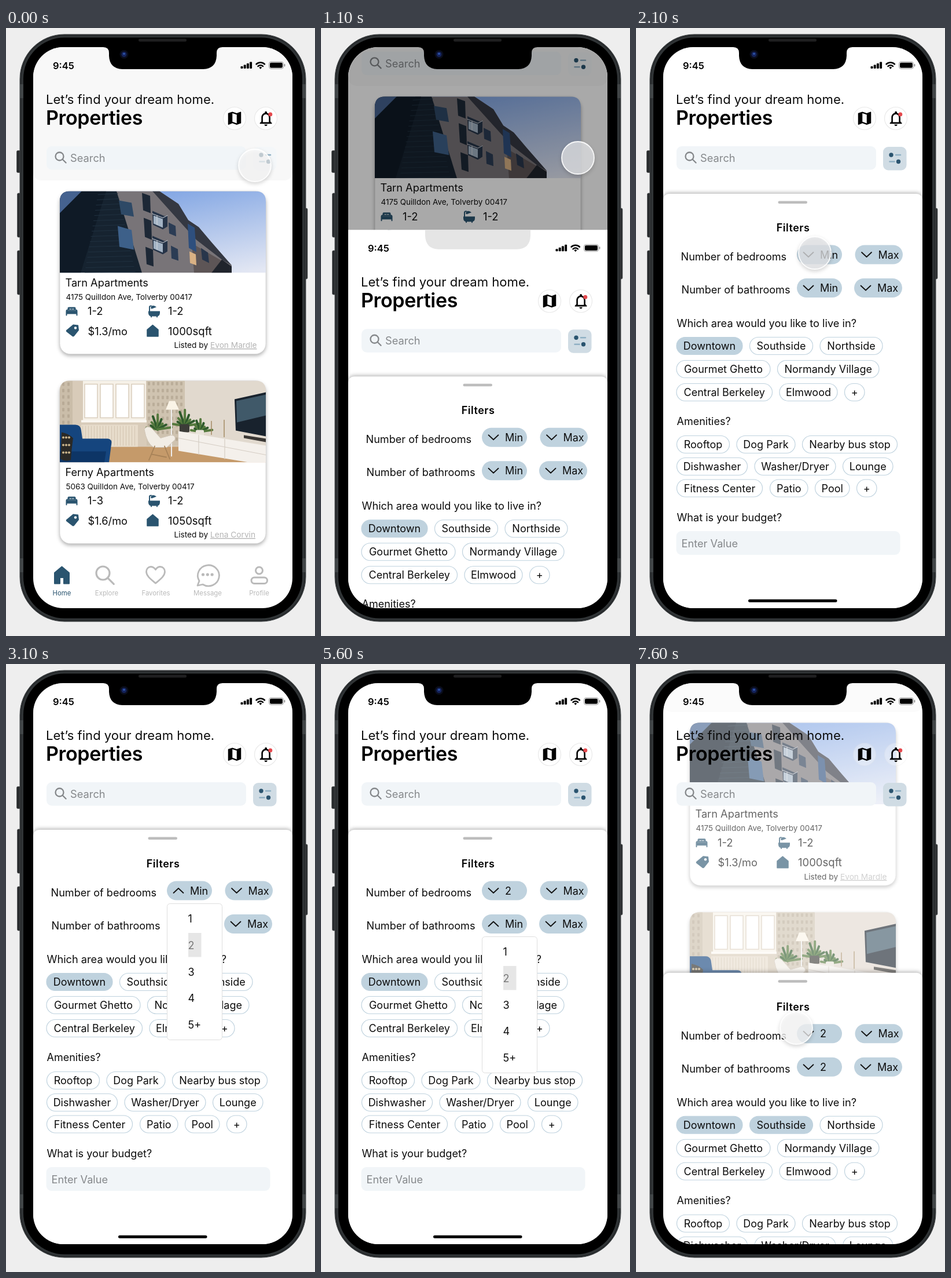
Write an HTML page that moves like this. It is 534 px wide and 1049 px high and loops after 7.7 s.

```html
<!DOCTYPE html>
<html lang="en">
<head>
<meta charset="utf-8">
<title>Property filters</title>
<style>
  html, body { margin: 0; width: 100%; height: 100%; overflow: hidden; background: #eee; }
  svg { display: block; width: 100vw; height: 100vh; font-family: Inter, Roboto, sans-serif; }
  text { white-space: pre; }
  .card { filter: drop-shadow(0 3px 3px rgba(0,0,0,.3)); }
  .sheet { filter: drop-shadow(0 -2px 3px rgba(0,0,0,.28)); }
  .cursor { filter: drop-shadow(0 3px 3px rgba(0,0,0,.2)); }
  .line { fill: none; stroke-linecap: round; stroke-linejoin: round; }
</style>
</head>
<body>
<svg id="stage" viewBox="0 0 534 1049"></svg>
<script>
const LOOP = 7700, STEP = 100, SCREEN_H = 968;
const NAVY = '#2a546f', PILL = '#bfd2de', GREY = '#bababa';

// Drawing helpers
const rect = (x, y, w, h, r, fill, extra = '') =>
  `<rect x="${x}" y="${y}" width="${w}" height="${h}" rx="${r}" fill="${fill}" ${extra}/>`;
const circle = (x, y, r, fill, extra = '') => `<circle cx="${x}" cy="${y}" r="${r}" fill="${fill}" ${extra}/>`;
const poly = (points, fill) => `<polygon points="${points}" fill="${fill}"/>`;
const path = (d, fill, extra = '') => `<path d="${d}" fill="${fill}" ${extra}/>`;
const line = (d, color, width) => `<path class="line" d="${d}" stroke="${color}" stroke-width="${width}"/>`;
const text = (x, y, size, str, fill = '#0c0c0c', extra = '') =>
  `<text x="${x}" y="${y}" font-size="${size}" fill="${fill}" ${extra}>${str}</text>`;
const at = (x, y, body, scale = 1) => `<g transform="translate(${x} ${y}) scale(${scale})">${body}</g>`;
const repeat = (n, draw) => Array.from({ length: n }, (_, i) => draw(i)).join('');

const MAP = 'M20.5 3l-.16.03L15 5.1 9 3 3.36 4.9c-.21.07-.36.25-.36.48V20.5c0 .28.22.5.5.5l.16-.03L9 18.9l6 2.1 5.64-1.9c.21-.07.36-.25.36-.48V3.5c0-.28-.22-.5-.5-.5zM15 19l-6-2.11V5l6 2.11z';
const BELL = 'M12 22c1.1 0 2-.9 2-2h-4c0 1.1.9 2 2 2zm6-6v-5c0-3.07-1.63-5.64-4.5-6.32V4c0-.83-.67-1.5-1.5-1.5s-1.5.67-1.5 1.5v.68C7.64 5.36 6 7.92 6 11v5l-2 2v1h16v-1l-2-2zm-2 1H8v-6c0-2.48 1.51-4.5 4-4.5s4 2.02 4 4.5z';

const statusBar =
  text(81, 70.5, 16.5, '9:45', '#000', 'font-weight="600"') +
  repeat(4, i => rect(405.5 + i * 5.2, 66 - i * 2.5, 4, 4 + i * 2.5, 1, '#000')) +
  line('M432.5 62.5a10.5 10.5 0 0 1 14.5 0M435.5 66a6 6 0 0 1 8.5 0', '#000', 2.5) +
  path('M439.8 71l-2.5-3a4 4 0 0 1 5 0z', '#000') +
  rect(454.5, 58.3, 25, 12, 3.5, 'none', 'stroke="#999"') +
  rect(456, 59.8, 22, 9, 2.2, '#000') + rect(480.7, 62, 1.6, 4.5, 1, '#888');

const magnifier = (x, y, r, tail, color, width) =>
  circle(x, y, r, 'none', `stroke="${color}" stroke-width="${width}"`) +
  line(`M${x + r * .72} ${y + r * .72}l${tail} ${tail}`, color, width);

const disc = x => circle(x, 156, 19.5, '#fff', 'class="disc" stroke="#e9e9e9" stroke-width="1.2"');

const header = buttonFill => statusBar +
  text(69, 130.5, 22.1, 'Let’s find your dream home.') +
  text(69, 167, 34, 'Properties', '#000', 'font-weight="600" letter-spacing="-.35"') +
  disc(395) + at(380, 140.7, path(MAP, '#000'), 1.25) +
  disc(449) + at(433.5, 140.5, path(BELL, '#000'), 1.3) + circle(456.8, 149, 3.5, '#e5484d') +
  rect(70, 204, 345, 40.5, 9, '#f1f5f8') +
  magnifier(92.5, 221.5, 7, 6, '#85888b', 2.3) +
  text(111, 231, 18.3, 'Search', '#85888b') +
  rect(427, 205, 40.5, 40.5, 9, buttonFill) +
  line('M449 219h8M438.5 230.5h8', '#8fb0c4', 2.6) +
  circle(441, 219, 3.7, NAVY) + circle(453.5, 230.5, 3.7, NAVY);

// Card pictures, 356 x 141
const building = rect(0, 0, 356, 141, 0, 'url(#sky)') +
  poly('70,0 172,0 205,22 222,50 240,62 262,88 297,128 297,141 70,141', '#787478') +
  poly('172,0 205,22 222,50 240,62 262,88 297,128 280,118 236,84 205,50 160,0', '#343842') +
  poly('228,90 297,130 297,141 232,141', '#5d5556') +
  poly('0,0 98,0 142,141 0,141', '#162330') + poly('0,0 38,0 0,38', '#45628f') +
  poly('38,0 80,0 36,141 0,141 0,38', '#0f1a26') +
  repeat(16, i => line(`M${66 - i * 1.5} ${6 + i * 9}L${100 + i * 2} ${4 + i * 9}`, '#203140', 1)) +
  poly('102,16 124,20 128,44 106,40', '#2e4966') + poly('100,60 124,67 128,101 103,96', '#3d6089') +
  poly('142,3 156,8 157,38 144,33', '#1d2836') + poly('145,46 158,51 159,84 147,79', '#1d2836') +
  poly('148,96 161,101 162,130 150,126', '#1d2836') + poly('188,54 200,60 201,78 189,73', '#2b3c54') +
  poly('192,94 204,100 205,120 193,116', '#2b3c54') + poly('221,56 233,63 236,105 223,98', '#2e4f7d') +
  poly('224,104 235,109 236,128 225,124', '#d9b184') + poly('244,98 256,106 258,124 246,118', '#28364b') +
  [34, 77].map(y => poly(`160,${y} 181,${y + 9} 186,${y + 8} 186,${y + 27} 178,${y + 32} 161,${y + 24}`, '#263448') +
    poly(`162,${y + 8} 178,${y + 14} 178,${y + 29} 162,${y + 22}`, '#a3b3c4') +
    line(`M160 ${y + 5}L178 ${y + 12}L186 ${y + 8}M168 ${y + 8}v16`, '#d4d8de', 1)).join('') +
  poly('262,141 280,118 297,130 297,141', '#20242c');

const leaves = (x, y, size) => repeat(9, i => {
  const a = Math.PI * (1.05 + i * .113), r = size * (.75 + .25 * Math.sin(i * 5));
  return line(`M${x} ${y}L${x + r * Math.cos(a)} ${y + r * Math.sin(a)}`, i % 2 ? '#2f5a2c' : '#54793d', 4);
});

const livingRoom = rect(0, 0, 356, 141, 0, '#e1d9ce') + rect(0, 0, 215, 115, 0, '#d8cbb9') +
  poly('0,114 210,114 356,131 356,141 0,141', '#c59a6a') +
  rect(40, 0, 109, 69, 0, '#f6f1e8') +
  repeat(4, i => rect(43 + i * 27, 6, 22, 58, 0, '#fff', 'stroke="#d9cdbc" stroke-width="1.5"')) +
  rect(37, 68, 116, 4, 0, '#fbf8f2') + rect(37, 76, 98, 38, 1, '#e7dccb') +
  repeat(19, i => rect(39 + i * 5, 78, 1, 34, 0, '#d4c6b2')) +
  rect(0, 0, 22, 82, 0, '#cabda9') + rect(150, 0, 66, 112, 0, '#cfc3b0') +
  repeat(72, i => rect(152 + i % 8 * 8, 2 + (i >> 3) * 12, 4, 6, 1, '#a99c88', 'opacity=".55"')) +
  repeat(14, i => rect(4 + i % 2 * 9, 3 + (i >> 1) * 11, 4, 6, 1, '#a99c88', 'opacity=".55"')) +
  leaves(169, 84, 26) + leaves(216, 78, 28) + leaves(243, 88, 22) +
  rect(207, 75, 17, 14, 2, '#3c3c38') + rect(235, 85, 14, 12, 2, '#eae5dc') +
  line('M193 45v85', '#eee', 2) + poly('183,50 189,35 199,35 206,50', '#faf4e7') +
  poly('205,87 356,112 356,141 327,141 205,121', '#f4f0eb') +
  line('M205 99L356 128M240 94v33M285 101v34', '#d5cdc4', 1.2) +
  line('M262 93V70M284 97V68', '#a48b63', 1.5) +
  poly('302,32 356,20 356,96 304,86', '#18222d') + poly('305,35 356,24 356,60 306,72', '#405969') +
  poly('318,94 356,100 356,106 318,99', '#3a3734') +
  path('M146 84q4-8 13-2l15 17 18-5q9 0 7 8l-14 13h-23q-12-7-16-31z', '#f2ede5', 'stroke="#cfc4b6"') +
  line('M164 113l-10 24M181 113l9 22M159 127l25 5', '#a78258', 1.8) +
  path('M0 76h27q9 0 10 10l2 14h44q8 1 6 10l-4 31H0z', '#15457e') +
  path('M0 122h80l-3 19H0z', '#0d3566') +
  path('M3 89q12 2 20 10-3 20-4 38-10 3-18-2z', '#2a2926') +
  repeat(9, i => circle(6 + i % 3 * 5, 98 + (i / 3 | 0) * 13, 2, '#c9b48c'));

const bed = line('M-9 7v-7q0-2 2-2h14q2 0 2 2v7M-9 4H9', NAVY, 2) + rect(-9, -1, 18, 5, 1, NAVY) +
  path('M-7-2v-3q0-2 2-2h10q2 0 2 2v3h-3v-2h-3.5v2h-1v-2h-3.5v2z', NAVY);
const tub = path('M-10 0H10v3q0 6-6 6h-8q-6 0-6-6z', NAVY) + line('M-5 8v2M5 8v2M-8 0v-7q0-2 3-2', NAVY, 2) +
  path('M-6-5q1-6 7-4l3 2-8 3z', NAVY);
const tag = path('M-11-1L1-11l9 1 1 9-8 10q-2 2-4 0L-10 2q-2-1-1-3z', NAVY) + circle(5, -5, 2.2, '#fff');
const house = path('M-9.5-2L0-10 9.5-2V9.5h-19z', NAVY, `stroke="${NAVY}" stroke-width="1.5" stroke-linejoin="round"`);

const card = (y, picture, info) => at(93, y,
  `<g class="card">${rect(0, 0, 356, 281, 18, '#fff', 'stroke="#cfcfcf" stroke-width=".6"')}</g>` +
  `<g clip-path="url(#photo)">${picture}</g>` +
  text(9.5, 164, 18.2, info.name) + text(10.5, 187, 13.5, info.address) +
  at(20.5, 207, bed) + text(48, 213.5, 18.4, info.beds) + at(163, 207, tub) + text(187, 213.5, 18.4, info.baths) +
  at(22, 241, tag) + text(48.5, 248, 18.2, info.price) + at(160.5, 241, house) + text(187, 248, 18.5, info.area) +
  text(197.5, 270.5, 13.7, 'Listed by') +
  text(260, 270.5, 13.7, info.agent, '#b4b4b4', 'text-decoration="underline"'));

const navLabel = (x, str, fill = GREY) => text(x, 978.5, 11.4, str, fill, 'text-anchor="middle"');
const nav =
  path('M84 940l12.5-10.5L109 940v18.5h-9V948h-7v10.5h-9z', NAVY, `stroke="${NAVY}" stroke-width="2" stroke-linejoin="round"`) +
  magnifier(167.5, 940.5, 11.5, 10.5, GREY, 3.2) +
  line('M258.5 958C249 950 242.5 945 242.5 938c0-5 3.5-8.5 8-8.5 4 0 6.5 2.5 8 5 1.5-2.5 4-5 8-5 4.5 0 8 3.5 8 8.5 0 7-6.5 12-16 20z', GREY, 2.8) +
  line('M331 962l3-8a18.5 18 0 1 1 6 6z', GREY, 2.8) +
  repeat(3, i => circle(340.5 + i * 7.8, 943, 2.6, GREY)) +
  circle(437.5, 936, 6, 'none', `stroke="${GREY}" stroke-width="3"`) +
  rect(424, 948, 27.5, 10.5, 5.2, 'none', `stroke="${GREY}" stroke-width="3"`) +
  navLabel(96.5, 'Home', NAVY) + navLabel(174, 'Explore') + navLabel(259, 'Favorites') +
  navLabel(348.5, 'Message') + navLabel(437.5, 'Profile');

const home = rect(47, 33, 448, 968, 0, '#fff') + rect(47, 0, 448, 263, 14, '#f8f8f8') +
  `<g id="homeHeader">${header('#f4f7f9')}</g>` +
  card(281.5, building, { name: 'Tarn Apartments', address: '4175 Quilldon Ave, Tolverby 00417', beds: '1-2', baths: '1-2',
    price: '$1.3/mo', area: '1000sqft', agent: 'Evon Mardle' }) +
  card(608.5, livingRoom, { name: 'Ferny Apartments', address: '5063 Quilldon Ave, Tolverby 00417', beds: '1-3', baths: '1-2',
    price: '$1.6/mo', area: '1050sqft', agent: 'Lena Corvin' }) + nav;

// Filter sheet
const chip = (str, x, y, w, id = '') =>
  rect(x, y, w, 30, 15, str === 'Downtown' ? PILL : '#fff', `stroke="${PILL}" stroke-width="1.2" ${id && `id="${id}"`}`) +
  text(x + w / 2, y + 21.5, 18, str, '#0c0c0c', 'text-anchor="middle"');
const pill = (x, y, w, label, id) => rect(x, y, w, 33, 16.5, PILL) +
  `<path class="line" id="${id}Arrow" d="" stroke="#111" stroke-width="1.8" transform="translate(${x + 20} ${y + 16.5})"/>` +
  text(x + 40, y + 23, 18, label, '#0c0c0c', `id="${id}Label"`);

const sheet = `<g class="sheet">${rect(47, 286, 448, 760, 10, '#fff')}</g>` +
  rect(245.5, 298.5, 50.5, 4.5, 2.2, '#bdbdbd') +
  text(271.5, 351, 18, 'Filters', '#000', 'font-weight="600" letter-spacing=".5" text-anchor="middle"') +
  text(77.5, 401, 18.1, 'Number of bedrooms') + text(78.5, 458, 18.1, 'Number of bathrooms') +
  pill(278, 374.5, 78, 'Min', 'bedMin') + pill(378.5, 374.5, 82.5, 'Max', 'bedMax') +
  pill(278, 432, 78, 'Min', 'bathMin') + pill(377, 432, 83, 'Max', 'bathMax') +
  text(70.5, 516, 18.2, 'Which area would you like to live in?') +
  chip('Downtown', 70, 533.5, 114) + chip('Southside', 196.5, 533.5, 109, 'southside') + chip('Northside', 318, 533.5, 108) +
  chip('Gourmet Ghetto', 70, 573.5, 162) + chip('Normandy Village', 244.5, 573.5, 175.5) +
  chip('Central Berkeley', 70, 613.5, 165.5) + chip('Elmwood', 248, 613.5, 100) + chip('+', 360.5, 613.5, 34.5) +
  text(70.5, 685, 18, 'Amenities?') +
  chip('Rooftop', 70.5, 703.5, 91) + chip('Dog Park', 174, 703.5, 101) + chip('Nearby bus stop', 287.5, 703.5, 164) +
  chip('Dishwasher', 70.5, 741.5, 122) + chip('Washer/Dryer', 205, 741.5, 140) + chip('Lounge', 357.5, 741.5, 86.5) +
  chip('Fitness Center', 70.5, 779, 148) + chip('Patio', 231.5, 779, 65.5) + chip('Pool', 309.5, 779, 59.5) + chip('+', 381.5, 779, 34.5) +
  text(70.5, 850.5, 18.1, 'What is your budget?') + rect(69.5, 868, 387, 41, 9, '#f1f5f8') +
  text(78.5, 895.5, 18.2, 'Enter Value', '#85888b') + rect(194, 985.8, 153.5, 5, 2.5, '#000');

const dropdown = rect(278.5, 470.5, 95, 235, 5, '#fff', 'stroke="#dedede"') +
  rect(315, 521, 22.5, 41.5, 0, '#e6e6e6', 'id="hover"') +
  ['1', '2', '3', '4', '5+'].map((n, i) => text(314.5, 503.3 + i * 45.7, 18, n, '#0c0c0c', `id="option${i}"`)).join('');

const page = `<g id="backdrop">${rect(47, 33, 448, 968, 0, '#fff')}` +
  path('M180 33h182v10q-1 23-23 23.5H203q-22-.5-23-23.5z', '#e5e5e5') + '</g>' +
  `<g id="pageHeader">${header('#d0dce4')}</g><g id="sheet">${sheet}</g><g id="dropdown">${dropdown}</g>`;

const sideButton = (x, y, w, h) => rect(x, y, w, h, 2, '#282b2d', 'stroke="#484b4d" stroke-width=".7"');
const phone = sideButton(18.5, 211.5, 8, 38) + sideButton(19.5, 285, 7, 76) + sideButton(19.5, 384, 7, 76) + sideButton(515, 311, 6, 122) +
  rect(24, 11, 494, 1013, 77, '#26292b', 'stroke="#45494b"') +
  rect(26.5, 13.5, 489, 1008, 74.5, '#303436') +
  [97, 915].map(y => rect(24, y, 6, 24, 0, '#414547') + rect(512, y, 6, 24, 0, '#414547')).join('') +
  rect(30, 16.5, 482, 1002, 71, '#000') + rect(229, 18.5, 83, 5, 2.5, '#1f1f20');
const notch = path('M168 33q10 0 10 10v5q1 22 23 23h140q22-1 23-23v-5q0-10 10-10z', '#000') +
  circle(204, 45.5, 7.5, '#0a0d1a') + circle(204, 45.5, 4.5, '#14235c') + circle(204, 44.5, 1.8, '#3158ad');

const stage = document.getElementById('stage');
stage.innerHTML = `<defs>
  <linearGradient id="sky" x1=".4" y1="0" x2=".9" y2="1"><stop stop-color="#7fa4e3"/><stop offset="1" stop-color="#e3e7f3"/></linearGradient>
  <clipPath id="photo"><path d="M0 141V18Q0 0 18 0H338Q356 0 356 18V141z"/></clipPath>
  <clipPath id="screen"><rect x="47" y="33" width="448" height="968" rx="52"/></clipPath></defs>
  ${rect(0, 0, 534, 1049, 0, '#eee')}${phone}
  <g clip-path="url(#screen)"><g id="home">${home}</g>${rect(47, 33, 448, 968, 0, '#000', 'id="veil"')}<g id="page">${page}</g></g>
  ${notch}<g id="cursor" class="cursor">${circle(0, 0, 28, '#fff', 'id="touch" stroke="#fff" stroke-opacity=".9" stroke-width="1.8"')}</g>`;

// Animation
const $ = id => document.getElementById(id);
const clamp = v => Math.min(1, Math.max(0, v));
const smooth = u => u * u * (3 - 2 * u);
const easeOut = u => 1 - (1 - clamp(u)) ** 1.65;
const within = (t, [from, to]) => t >= from && t < to;
const show = (id, on) => $(id).setAttribute('display', on ? 'inline' : 'none');
const move = (id, x, y) => $(id).setAttribute('transform', `translate(${x} ${y})`);

const SLIDE = 300, OPEN_AT = 952, CLOSE_AT = 7551;
const BED_MENU = [2200, 3300], BATH_MENU = [4700, 5700];
const PRESSES = [[900, 1200], [2100, 2300], [3100, 3400], [4600, 4800], [5500, 5800], [6500, 6900]];

// Pointer stops: time, x, y
const stops = [
  [0, 430, 237], [800, 444, 224], [1200, 444, 224], [2050, 309, 388], [2500, 309, 388],
  [3100, 316, 486], [3400, 316, 486], [4200, 352, 449], [4600, 301, 457], [4900, 301, 457], [5500, 326, 541],
  [5900, 326, 541], [6500, 262, 541], [6800, 262, 541], [7000, 276, 308], [7300, 276, 308], [7600, 277, 628], [LOOP, 277, 628]
];
function pointer(t) {
  const i = stops.findIndex((s, n) => t < stops[n + 1][0]);
  const [t0, x0, y0] = stops[i], [t1, x1, y1] = stops[i + 1], u = smooth((t - t0) / (t1 - t0));
  return [x0 + (x1 - x0) * u, y0 + (y1 - y0) * u];
}

const setArrow = (id, up) => $(id + 'Arrow').setAttribute('d', up ? 'M-8.5 4L0-4L8.5 4' : 'M-8.5-4L0 4L8.5-4');
setArrow('bedMax');
setArrow('bathMax');

function render(t) {
  const closing = t >= CLOSE_AT;
  const opened = easeOut((t - OPEN_AT) / SLIDE);
  const closed = easeOut((t - CLOSE_AT) / SLIDE);
  const covered = opened - closed;

  // The screen behind travels a quarter of the distance and is veiled by half.
  move('home', 0, -SCREEN_H / 4 * covered);
  $('veil').setAttribute('fill', closing ? '#fff' : '#000');
  $('veil').setAttribute('opacity', covered / 2);
  show('homeHeader', !closing);
  show('backdrop', !closing);
  show('page', opened > 0);
  move('page', 0, SCREEN_H * (1 - opened));
  move('sheet', 0, SCREEN_H * closed);
  document.querySelectorAll('#pageHeader .disc').forEach(d => d.setAttribute('opacity', closing ? .3 : 1));

  const bedOpen = within(t, BED_MENU), bathOpen = within(t, BATH_MENU);
  const pressed = PRESSES.some(span => within(t, span));
  const picking = pressed && (within(t, [3100, 3300]) || within(t, [5500, 5700]));
  show('dropdown', bedOpen || bathOpen);
  move('dropdown', 0, bedOpen ? -57 : 0);
  show('hover', picking);
  $('option1').setAttribute('fill', picking ? '#777' : '#0c0c0c');
  setArrow('bedMin', bedOpen);
  setArrow('bathMin', bathOpen);
  $('bedMinLabel').textContent = t >= BED_MENU[1] ? '2' : 'Min';
  $('bathMinLabel').textContent = t >= BATH_MENU[1] ? '2' : 'Min';
  $('southside').setAttribute('fill', t >= 6600 ? PILL : '#fff');

  show('cursor', !picking);
  $('touch').setAttribute('fill', pressed ? 'rgba(229,230,232,.75)' : 'rgba(252,252,252,.72)');
  move('cursor', ...pointer(t));
}

const start = performance.now();
function tick() {
  const t = (performance.now() - start) % LOOP;
  render(Math.floor(t / STEP) * STEP);
  requestAnimationFrame(tick);
}
tick();
</script>
</body>
</html>
```
